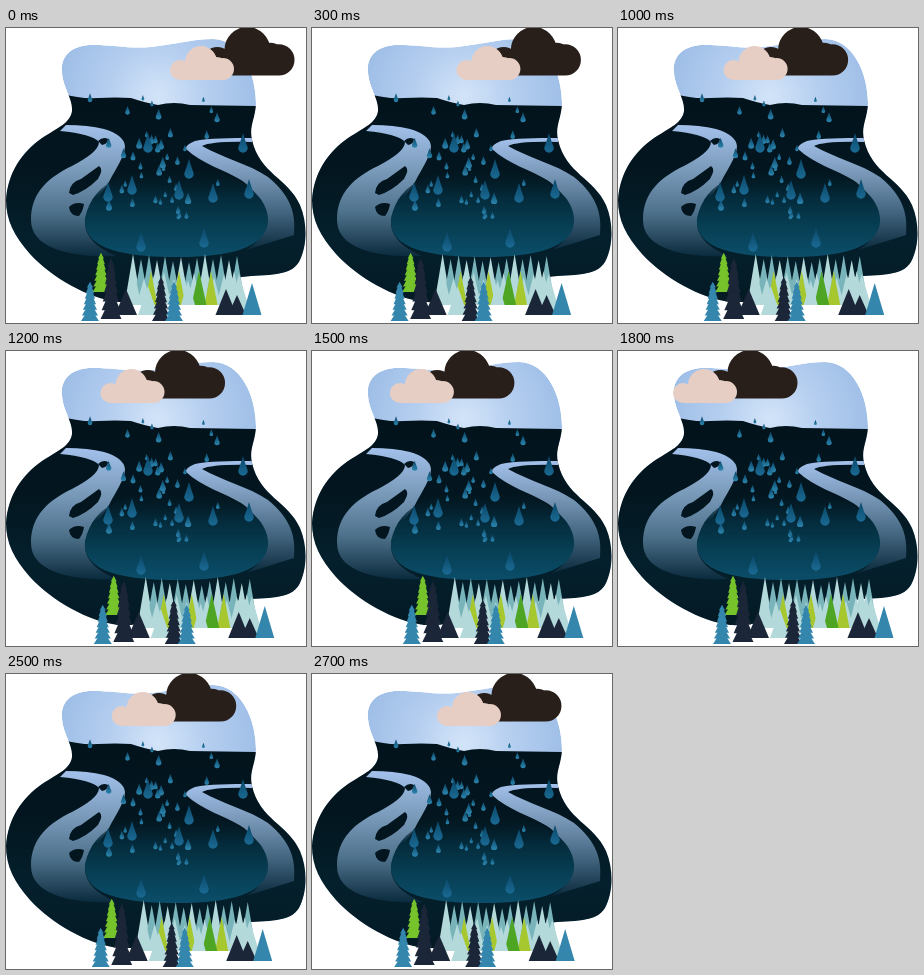
An HTML page with a canvas that plays this animation: 300x295 px, repeating every 2.8 s.

```html
<!DOCTYPE html>
<html lang="en">
<head>
<meta charset="utf-8">
<title>Rainy valley</title>
<style>
  html, body { margin: 0; width: 100%; height: 100%; overflow: hidden; background: #fff; }
  canvas { display: block; }
</style>
</head>
<body>
<canvas id="stage" width="300" height="295"></canvas>
<script>
const ctx = document.getElementById('stage').getContext('2d');
const LOOP = 2800, STEP = 100;

// Progress of the shared pan at given times (ms); it restarts with a jump.
const PAN = [[0, 0], [300, .18], [1500, .79], [1800, 1], [2000, .95], [2200, .8], [2800, .27]];

function panAt(t) {
  const i = PAN.findIndex(key => key[0] > t);
  const [t0, p0] = PAN[i - 1], [t1, p1] = PAN[i];
  return p0 + (p1 - p0) * (t - t0) / (t1 - t0);
}

function seededRandom(seed) {
  return () => (seed = seed * 16807 % 2147483647) / 2147483647;
}

function fill(c, path, style) {
  c.fillStyle = style;
  c.fill(typeof path === 'string' ? new Path2D(path) : path);
}

function withStops(gradient, colors) {
  colors.forEach((color, i) => gradient.addColorStop(i / (colors.length - 1), color));
  return gradient;
}

const vertical = (c, y0, y1, ...colors) => withStops(c.createLinearGradient(0, y0, 0, y1), colors);
const radial = (c, x, y, r, ...colors) => withStops(c.createRadialGradient(x, y, 0, x, y, r), colors);

const BLOB = `M56 45C54 28 66 17 86 17C112 17 122 21 145 19C170 16 188 11 207 11
  C236 12 250 46 250 76C249 92 243 98 246 112C254 146 282 150 294 177
  C302 196 301 219 293 234C284 249 262 246 236 249C194 254 152 276 112 274
  C82 270 46 250 24 226C8 208 0 192 0 172C2 144 16 124 36 110
  C53 99 64 95 66 83C67 71 57 60 56 45Z`;
const LAND = 'M0 66H57Q74 71 92 70T125 70Q140 75 152 77Q168 73 184 77L250 78L300 100V295H0Z';
const LEFT_RIVER = `M60 97Q82 97 98 101Q118 107 119 118C119 128 109 142 104 152
  C97 166 79 180 79 196Q80 215 110 228C66 230 25 221 25 192
  C25 164 43 149 66 138C81 130 93 122 93 114Q86 106 54 103Z`;
const RIGHT_RIVER = `M246 110C225 110 202 110 189 113Q179 117 180 121C196 136 219 142 235 152
  C253 164 262 185 259 202Q254 214 240 222L288 207C290 185 285 168 262 149
  C243 136 217 130 196 118Q206 113 246 114Z`;
const POOL = 'M79 190C87 152 124 140 176 140C226 140 264 165 262 195C259 219 226 229 172 229C120 229 76 222 79 190Z';
const ISLANDS = `M92 113Q97 108 102 111Q102 116 96 117Z
  M63 165Q64 154 75 151L93 138Q98 141 92 151Q80 163 67 167Z
  M63 179Q69 173 78 176Q77 183 73 188Q64 188 63 179Z`;

const BIG_DROPS = [[142, 116], [237, 116], [183, 142], [102, 165], [126, 158],
  [173, 163], [207, 166], [243, 162], [198, 211], [135, 215]];

function drop(c, x, y, w, h, light) {
  const path = `M${x} ${y - h}Q${x + w * .4} ${y - h * .4} ${x + w} ${y + h * .35}
    A${w} ${w} 0 1 1 ${x - w} ${y + h * .35}Q${x - w * .4} ${y - h * .4} ${x} ${y - h}Z`;
  fill(c, path, vertical(c, y - h, y + h, '#0b4768', light));
}

function makeScene() {
  const canvas = document.createElement('canvas');
  canvas.width = 300;
  canvas.height = 295;
  const c = canvas.getContext('2d');
  c.clip(new Path2D(BLOB));
  fill(c, BLOB, radial(c, 152, 68, 105, '#d3e4f8', '#b3cdef', '#9dbde6'));
  fill(c, LAND, vertical(c, 75, 276, '#02131c', '#03161f', '#04202c', '#041a25'));
  fill(c, LEFT_RIVER, vertical(c, 97, 230, '#a3c1eb', '#7b9bbb', '#4d708a', '#08283a'));
  fill(c, RIGHT_RIVER, vertical(c, 110, 222, '#a3c1eb', '#7796b6', '#42647e', '#0b2b3d'));
  fill(c, ISLANDS, '#03161f');
  fill(c, POOL, vertical(c, 140, 229, 'rgba(3,24,34,0)', '#042b3b', '#073f55', '#0b4e69'));

  const random = seededRandom(11);
  for (let i = 0; i < 44; i++) {
    const y = 70 + 118 * random();
    const x = 155 + (random() + random() - 1) * 75;
    const size = 1.4 + 1.8 * random();
    drop(c, x, y, size, size * 2, '#2f8bb5');
  }
  for (const [x, y] of BIG_DROPS) drop(c, x, y, 4.8, 11, '#1c6e99');
  return canvas;
}

function cloud(x, y, scale, color) {
  const p = new Path2D();
  for (const [cx, cy, r] of [[10, 24, 10], [31, 16, 16], [47, 21, 10], [53, 23, 11]]) {
    p.moveTo(cx + r, cy);
    p.arc(cx, cy, r, 0, 2 * Math.PI);
  }
  p.rect(10, 20, 43, 14);
  ctx.save();
  ctx.translate(x, y);
  ctx.scale(scale, scale);
  fill(ctx, p, color);
  ctx.restore();
}

function triangle(x, top, bottom, width, color) {
  fill(ctx, `M${x} ${top}L${x + width / 2} ${bottom}H${x - width / 2}Z`, color);
}

function fir(x, top, bottom, width, color) {
  const tiers = 7, h = (bottom - top) / tiers;
  for (let i = 0; i < tiers; i++) {
    const tip = top + Math.max(0, i - 1.5) * h;
    triangle(x, tip, top + (i + 1) * h, width * (.35 + .65 * i / (tiers - 1)), color);
  }
}

function forest() {
  const TEAL = '#78b4ba', PALE = '#b3d9da', LIME = '#a6c82e', NAVY = '#1b2638', BLUE = '#3486ad';
  for (let i = 0; i < 14; i++) triangle(127 + i * 8, 226 + i * 5 % 9, 277, 17, i % 3 ? TEAL : PALE);
  for (let i = 0; i < 11; i++) triangle(128 + i * 10, 243 + i * 7 % 10, 277, 15, PALE);
  for (const x of [145, 173, 205]) triangle(x, 243, 277, 13, LIME);
  triangle(193, 243, 277, 15, '#4da523');
  triangle(182, 252, 277, 14, PALE);
  triangle(233, 246, 287, 24, PALE);
  triangle(142, 258, 287, 20, PALE);

  fir(95, 225, 264, 17, '#76c32c');
  triangle(120, 261, 287, 22, NAVY);
  triangle(231, 267, 287, 18, NAVY);
  triangle(220, 261, 287, 21, NAVY);
  triangle(246, 255, 287, 19, BLUE);
  fir(105, 230, 291, 21, NAVY);
  fir(84, 254, 293, 18, BLUE);
  fir(155, 249, 293, 18, NAVY);
  fir(168, 254, 293, 18, BLUE);
}

const scene = makeScene();

function draw(now) {
  const pan = panAt(Math.floor(now % LOOP / STEP) * STEP);
  ctx.clearRect(0, 0, 300, 295);
  ctx.drawImage(scene, 0, 0);

  const x = 164 - 109 * pan;
  cloud(x + 33, -1, 1.43, '#291f1a');
  cloud(x, 18, 1, '#e6cec4');

  ctx.save();
  ctx.translate(20 * pan, 0);
  forest();
  ctx.restore();
}

const start = performance.now();
function tick() {
  draw(performance.now() - start);
  requestAnimationFrame(tick);
}
tick();
</script>
</body>
</html>
```
